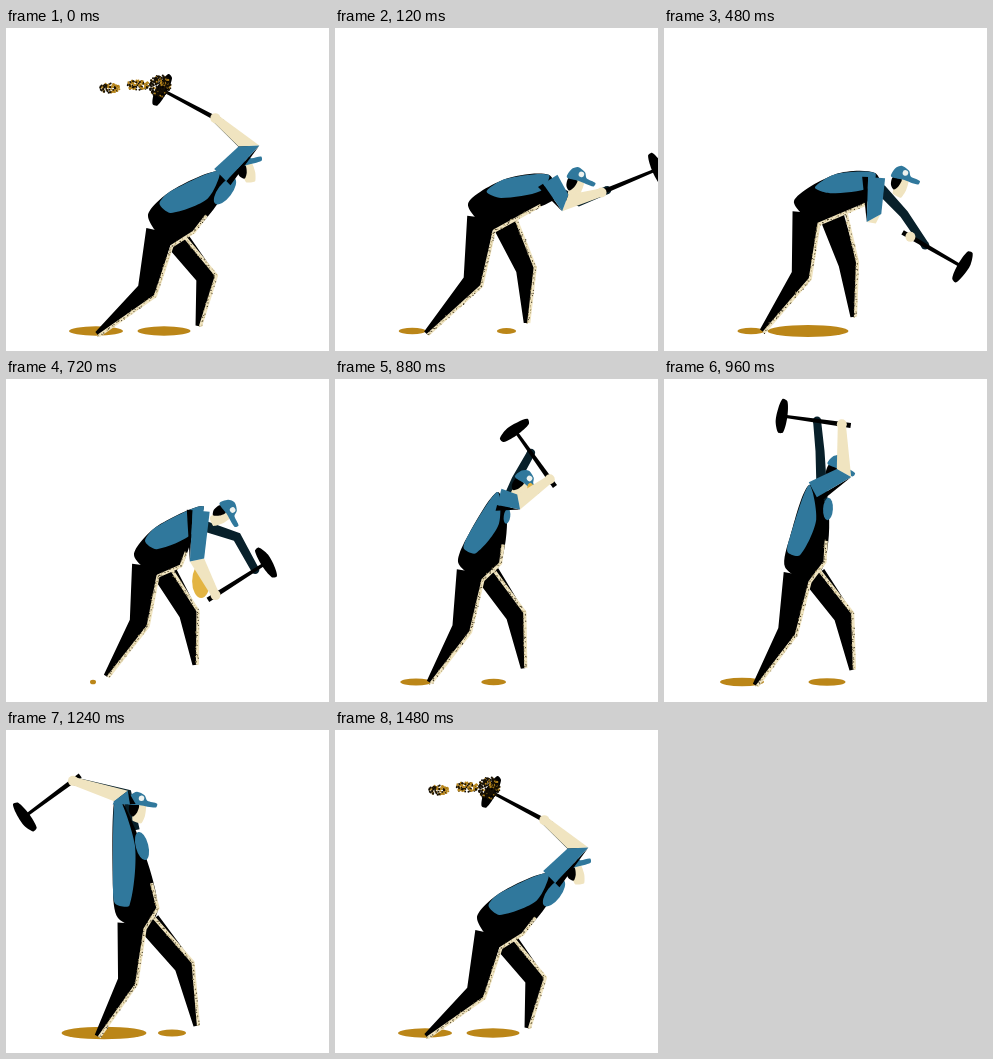
An HTML page with a canvas that plays this animation: 323 by 323 pixels, repeating every 1.52 s.

```html
<!DOCTYPE html>
<html lang="en">
<head>
<meta charset="utf-8">
<title>Hammer swing</title>
<style>
html, body { margin: 0; width: 100%; height: 100%; overflow: hidden; background: #fff; }
canvas { display: block; width: 100vw; height: 100vh; }
</style>
</head>
<body>
<canvas id="stage" width="323" height="323"></canvas>
<script>
const ctx = document.getElementById('stage').getContext('2d');
const LOOP = 1520;
const BLUE = '#30789c', CREAM = '#f0e4c0', DARK = '#08202a', GOLD = '#bb8618', YELLOW = '#e3b443';

// Start of each held drawing, in ms
const STEPS = [0, 40, 80, 120, 160, 320, 400, 480, 560, 640, 720, 800, 880, 960, 1040, 1120, 1240, 1400, 1480];

// A few joints per pose; every outline is derived from them.
// head: x, y, tilt. arm: angle and reach of the hand from the nape.
// tool: handle angle, far grip distance. bend: knee bulge, back and front.
// show: visible forearm, bib and glow. shade: centre and length of two shadows.
const raised = {
  seat: [142, 188], back: [165, 163], nape: [213, 143], chest: [219, 163], belly: [188, 204], crotch: [166, 218],
  heel: [91, 306], toe: [192, 298], bend: [20, 19], head: [238, 137, -20],
  elbow: [243, 118], farElbow: [238, 118], arm: [-94, 53], tool: [-152, 0],
  show: [1, 1, 0], shade: [90, 54, 158, 53]
};
const struck = {
  seat: [130, 172], back: [172, 147], nape: [214, 148], chest: [222, 171], belly: [198, 176], crotch: [157, 198],
  heel: [91, 305], toe: [191, 294], bend: [20, 8], head: [243, 156, 30],
  elbow: [226, 194], farElbow: [246, 192], arm: [56, 81], tool: [20.6, 8],
  show: [1, 0, 0], shade: [73, 18, 176, 8]
};
const rebound = {
  seat: [130, 173], back: [172, 146], nape: [211, 145], chest: [219, 168], belly: [200, 177], crotch: [155, 196],
  heel: [98, 303], toe: [189, 289], bend: [17, 6], head: [237, 150, 15],
  elbow: [210, 190], farElbow: [240, 186], arm: [61, 73], tool: [30, 17],
  show: [0.1, 0, 0], shade: [87, 27, 144, 81]
};
const lift = {
  seat: [128, 176], back: [150, 148], nape: [197, 127], chest: [188, 152], belly: [175, 187], crotch: [152, 197],
  heel: [100, 297], toe: [189, 286], bend: [13, 10], head: [220, 132, 55],
  elbow: [191, 181], farElbow: [231, 158], arm: [82, 90], tool: [-32.5, 47],
  show: [1, 0, 1], shade: [87, 6, 150, 0]
};
const overhead = {
  seat: [121, 188], back: [126, 158], nape: [145, 106], chest: [164, 130], belly: [161, 183], crotch: [146, 203],
  heel: [91, 306], toe: [188, 291], bend: [11, 12], head: [173, 88, 25],
  elbow: [180, 94], farElbow: [156, 72], arm: [-61.6, 69], tool: [-172, 25],
  show: [1, 0.7, 0], shade: [78, 44, 163, 37]
};
const windup = {
  seat: [112, 188], back: [107, 160], nape: [110, 64], chest: [136, 116], belly: [152, 178], crotch: [139, 199],
  heel: [91, 306], toe: [190, 296], bend: [13, 14], head: [132, 74, 5],
  elbow: [115, 66], farElbow: [121, 64], arm: [-163, 45], tool: [-216.5, 0],
  show: [1, 0.9, 0], shade: [98, 85, 166, 28]
};

const KEYS = [[0, raised], [4, struck], [5, struck], [7, rebound], [10, lift], [13, overhead], [16, windup], [18, raised]];

const mix = (p, q, u) => p.map((v, i) => v + (q[i] - v) * u);
const dist = (p, q) => Math.hypot(p[0] - q[0], p[1] - q[1]);
const rad = deg => deg * Math.PI / 180;
const polar = (p, deg, r) => [p[0] + r * Math.cos(rad(deg)), p[1] + r * Math.sin(rad(deg))];

function poseAt(step) {
  const i = Math.max(1, KEYS.findIndex(k => k[0] >= step));
  const [[s0, a], [s1, b]] = [KEYS[i - 1], KEYS[i]];
  const u = (step - s0) / (s1 - s0);
  const pose = {};
  for (const name in a) pose[name] = mix(a[name], b[name], u);
  // Arms fold in the middle of a wide swing
  const turn = Math.abs(b.arm[0] - a.arm[0]) / 180;
  pose.arm[1] *= 1 - 0.42 * turn * Math.sin(Math.PI * u);
  return pose;
}

function seeded(s) {
  return () => (s = (s * 16807) % 2147483647) / 2147483647;
}

// Unit normal of p to q, on the figure's front side for a downward limb
function normal(p, q) {
  const d = dist(p, q) || 1;
  return [(q[1] - p[1]) / d, (p[0] - q[0]) / d];
}

// Two edges of a jointed limb, mitred at the middle joint
function limb([a, b, c], [wa, wb, wc]) {
  const n1 = normal(a, b), n2 = normal(b, c);
  const m = 1 / Math.max(0.6, 1 + n1[0] * n2[0] + n1[1] * n2[1]);
  const nb = [(n1[0] + n2[0]) * m, (n1[1] + n2[1]) * m];
  const edge = s => [[a, n1, wa], [b, nb, wb], [c, n2, wc]]
    .map(([p, n, w]) => [p[0] + n[0] * w * s, p[1] + n[1] * w * s]);
  return { front: edge(0.5), rear: edge(-0.5) };
}

function poly(pts, color) {
  ctx.beginPath();
  pts.forEach(p => ctx.lineTo(...p));
  ctx.fillStyle = color;
  ctx.fill();
}

// Closed soft outline: tangents fade out at sharp corners
function blob(pts, color, k = 0.28) {
  const n = pts.length, at = i => pts[(i + n) % n];
  const ctrl = (i, to, s) => {
    const p = at(i), a = at(i - 1), b = at(i + 1);
    const f = s * k * dist(p, to) / (dist(p, a) + dist(p, b) || 1);
    return [p[0] + (b[0] - a[0]) * f, p[1] + (b[1] - a[1]) * f];
  };
  ctx.beginPath();
  ctx.moveTo(...pts[0]);
  for (let i = 0; i < n; i++) {
    ctx.bezierCurveTo(...ctrl(i, at(i + 1), 1), ...ctrl(i + 1, at(i), -1), ...at(i + 1));
  }
  ctx.fillStyle = color;
  ctx.fill();
}

function oval([x, y], rx, ry, color, turn = 0) {
  ctx.beginPath();
  ctx.ellipse(x, y, rx, ry, turn, 0, 7);
  ctx.fillStyle = color;
  ctx.fill();
}

function trim(pts, rnd) {
  ctx.beginPath();
  pts.forEach(p => ctx.lineTo(...p));
  ctx.strokeStyle = CREAM;
  ctx.lineWidth = 3.2;
  ctx.lineJoin = 'round';
  ctx.stroke();
  for (let i = 1; i < pts.length; i++) {
    const len = dist(pts[i - 1], pts[i]);
    for (let d = 0; d < len; d += 1.5) {
      const [x, y] = mix(pts[i - 1], pts[i], d / len);
      oval([x + rnd() * 3 - 2, y + rnd() * 3 - 1.5], 0.6, 0.6, rnd() < 0.5 ? '#3d3420' : '#a89868');
    }
  }
}

function speckle(x, y, rx, ry, dark, rnd) {
  for (let i = 0; i < rx * ry * 1.8; i++) {
    const a = rnd() * 6.283, r = Math.sqrt(rnd());
    oval([x + Math.cos(a) * r * rx, y + Math.sin(a) * r * ry], 1, 1, rnd() < dark ? '#171004' : '#b8861c');
  }
}

function placed([x, y], deg, paint) {
  ctx.save();
  ctx.translate(x, y);
  ctx.rotate(rad(deg));
  paint();
  ctx.restore();
}

function hammer() {
  poly([[-9, -2.5], [60, -1.5], [60, 1.5], [-9, 2.5]], '#000');
  blob([[57, -16], [62, -17], [66, -6], [65, 8], [62, 17], [57, 15], [55, 0]], '#000');
}

function head() {
  blob([[-4, 1], [8, 1], [8, 11], [5, 19], [-4, 17]], CREAM, 0.15);
  blob([[-8, 1], [1, 1], [0, 8], [-4, 13], [-8, 9]], '#000');
  blob([[-10, 1], [-8, -8], [-2, -12], [6, -9], [9, -4], [19, -2], [18, 2], [2, 1]], BLUE);
  oval([3, -6], 2.8, 2.8, '#eef2ee');
}

function leg(hip, foot, bulge, top) {
  const n = normal(hip, foot), mid = mix(hip, foot, 0.48);
  const knee = [mid[0] + n[0] * bulge, mid[1] + n[1] * bulge];
  const { front, rear } = limb([hip, knee, foot], [top, 19, 5]);
  poly([...front, ...rear.reverse()], '#000');
  return front;
}

function draw(step) {
  const p = poseAt(step);
  const rnd = seeded(71 + step % 18 * 13);
  const [cx1, len1, cx2, len2] = p.shade;
  const [sleeveShow, bib, glow] = p.show;
  const hand = polar(p.nape, ...p.arm);
  ctx.fillStyle = '#fff';
  ctx.fillRect(0, 0, 323, 323);

  for (const [x, len] of [[cx1, len1], [cx2, len2]]) {
    if (len > 1) oval([x, 303], len / 2, 2 + len * 0.05, GOLD);
  }

  const farHand = polar(hand, ...p.tool);
  const far = limb([mix(p.nape, p.chest, 0.7), p.farElbow, farHand], [11, 9, 8]);
  poly([...far.front, ...far.rear.reverse()], DARK);
  oval(farHand, 4.2, 4.2, DARK);
  placed(hand, p.tool[0], hammer);
  if (step % 18 === 0) {
    speckle(104, 60, 10, 5, 0.4, rnd);
    speckle(132, 57, 12, 5, 0.4, rnd);
    speckle(154, 58, 11, 11, 0.8, rnd);
  }
  placed(p.head, p.head[2], head);

  const frontEdge = leg(mix(p.crotch, p.belly, 0.3), p.toe, p.bend[1], 24);
  const backEdge = leg(mix(p.seat, p.crotch, 0.5), p.heel, p.bend[0], 28);
  blob([p.seat, p.back, p.nape, p.chest, p.belly, p.crotch], '#000');
  trim([mix(p.crotch, p.belly, 0.6), ...frontEdge.slice(1)], rnd);
  trim([mix(p.belly, p.chest, 0.4), p.belly, p.crotch, ...backEdge.slice(1)], rnd);

  const waist = mix(p.seat, p.back, 0.5);
  blob([waist, p.back, p.nape, mix(p.nape, p.belly, 0.45), mix(waist, p.belly, 0.33)], BLUE);
  const lean = Math.atan2(p.belly[1] - p.chest[1], p.belly[0] - p.chest[0]);
  oval(p.chest, 16 * bib, 7 * bib, BLUE, lean);

  const [gx, gy] = mix(p.elbow, hand, 0.6);
  oval([gx - 7, gy], 9 * glow, 17 * glow, YELLOW);

  const near = limb([mix(p.nape, p.chest, 0.2), p.elbow, mix(p.elbow, hand, sleeveShow)], [17, 14, 8]);
  const [f0, f1, f2] = near.front, [r0, r1, r2] = near.rear;
  const under = [r0[0] + (r0[0] - f0[0]) * 0.35, r0[1] + (r0[1] - f0[1]) * 0.35];
  oval(hand, 5, 5, CREAM);
  poly([r0, r1, under], '#000');
  poly([f1, f2, r2, r1], CREAM);
  poly([f0, f1, r1, r0], BLUE);
}

let shown = -1;
function tick() {
  const t = performance.now() % LOOP;
  const step = STEPS.filter(s => s <= t).length - 1;
  if (step !== shown) draw(shown = step);
  requestAnimationFrame(tick);
}
tick();
</script>
</body>
</html>
```
